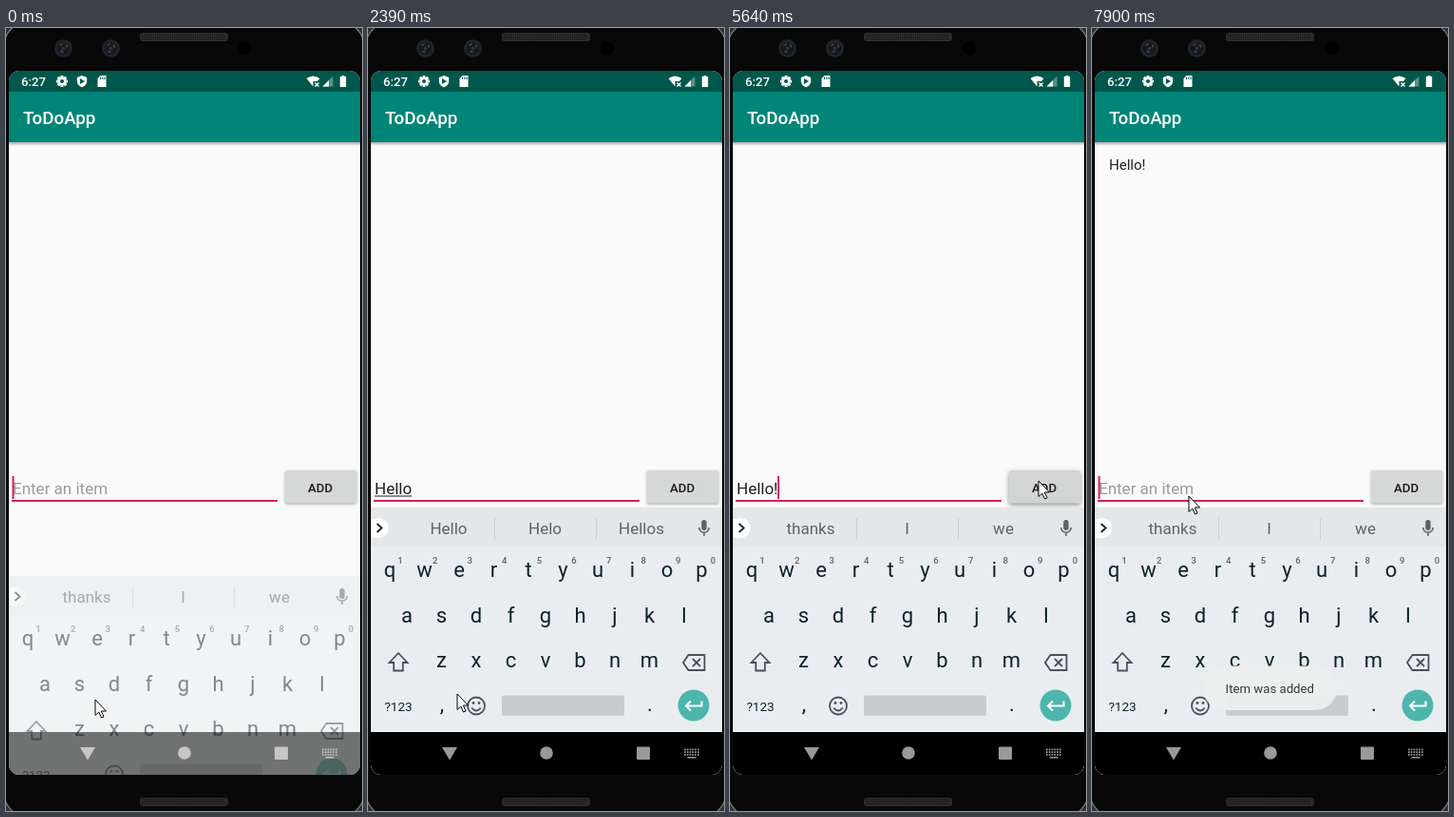
An HTML page with a canvas for the animation above (8 s loop, 375 by 823 pixels).

```html
<!DOCTYPE html>
<html lang="en">
<head>
<meta charset="utf-8">
<title>To-do app</title>
<style>
html, body { margin: 0; width: 100%; height: 100%; overflow: hidden; background: #000; }
canvas { display: block; }
</style>
</head>
<body>
<canvas id="stage" width="375" height="823"></canvas>
<script>
const LOOP = 8000;
const ctx = document.getElementById('stage').getContext('2d');
const INK = '#0c2227', GREY = '#5a6469', ICON = '#46525a';

// Each track is a list of [start time, ...values]; values hold until the next entry.
const FIELD = [ // text, caret visible
  [0, '', 1], [120, '', 0], [640, '', 1], [1190, 'H', 1], [1470, 'He', 1], [1600, 'Hel', 1],
  [1720, 'Hell', 1], [1870, 'Hello', 1], [2390, 'Hello', 0], [2980, 'Hello!', 1],
  [3500, 'Hello!', 0], [4090, 'Hello!\n', 1], [4520, 'Hello!\n', 0], [5070, 'Hello!\n', 1],
  [5220, 'Hello!', 1], [5760, 'Hello!', 0], [5910, '', 1], [6330, '', 0], [6730, '', 1],
  [7280, '', 0], [7780, '', 1]
];
const HINTS = [
  [0, 'thanks', 'I', 'we'], [1190, 'H', '*Hi', 'He'], [1470, 'He', 'Hey', 'Her'],
  [1600, 'Hel', '*Hello', 'Help'], [1720, 'Hell', 'Hello', 'Help'],
  [1870, 'Hello', 'Helo', 'Hellos'], [3100, 'thanks', 'I', 'we']
];
const POINTER = [
  [0, 94, 706], [120, 94, 700], [4520, 193, 579], [4670, 204, 542], [4820, 237, 500],
  [4950, 275, 450], [5070, 294, 453], [5220, 297, 460], [5370, 311, 468], [5500, 322, 475],
  [5640, 325, 476], [6180, 318, 479], [6330, 210, 490], [6460, 99, 499],
  [6730, 101, 496], [6860, 102, 494], [7010, 102, 492]
];
const SLIDE = [[0, 72, .5, .53], [120, 14, .88, .85], [240, 0, 1, 1]]; // offset, opacity, nav bar
const TOAST = [[0, 0], [6060, .45], [6180, .88], [6330, 1], [7900, .93]];

function at(track, t) {
  let current = track[0];
  for (const entry of track) if (entry[0] <= t) current = entry;
  return current.slice(1);
}

function text(str, x, y, size, color, align = 'left', weight = 400) {
  ctx.font = `${weight} ${size}px Roboto, sans-serif`;
  ctx.textAlign = align;
  ctx.fillStyle = color;
  ctx.fillText(str, x, y);
  return ctx.measureText(str).width;
}

function rect(x, y, w, h, color, radius = 0) {
  ctx.fillStyle = color;
  ctx.beginPath();
  ctx.roundRect(x, y, w, h, radius);
  ctx.fill();
}

function disc(x, y, r, color) {
  rect(x - r, y - r, 2 * r, 2 * r, color, r);
}

// Paths are given relative to (x, y).
function path(d, x, y, fill, stroke, width = 2) {
  const shape = new Path2D(d);
  ctx.save();
  ctx.translate(x, y);
  if (fill) { ctx.fillStyle = fill; ctx.fill(shape); }
  if (stroke) { ctx.strokeStyle = stroke; ctx.lineWidth = width; ctx.stroke(shape); }
  ctx.restore();
}

function speaker(y) {
  rect(141, y, 93, 9, '#2b2b2b', 3);
  for (let i = 0; i < 44; i++)
    for (let j = 0; j < 3; j++) rect(143 + i * 2, y + 1.5 + j * 2.2, 1, 1, '#111');
}

function lens(x) {
  disc(x, 21.5, 9.5, '#20242b');
  disc(x, 21.5, 6.5, '#14171c');
  path('M-4 -3 L-1 -5 M3 -4 L4 -1 M-3 3 L0 4', x, 21.5, null, '#48505c', 1.5);
  disc(x, 21.5, 2, '#2c3440');
}

function body() {
  rect(0, 0, 375, 823, '#303030');
  rect(-3, -8, 381, 839, '#080808', 30);
  ctx.strokeStyle = '#777';
  ctx.lineWidth = 1.2;
  ctx.stroke();
  speaker(5);
  speaker(809);
  lens(60.5);
  lens(110.5);
  disc(252, 21.5, 7, '#000');
}

function statusBar() {
  rect(3, 45, 370, 22, '#00574b');
  text('6:27', 16, 61, 13.2, '#fff', 'left', 500);
  for (let i = 0; i < 4; i++) {
    ctx.save();
    ctx.translate(59, 56);
    ctx.rotate(i * Math.PI / 4);
    rect(-1.5, -6, 3, 12, '#fff', .5);
    ctx.restore();
  }
  disc(59, 56, 4.3, '#fff');
  disc(59, 56, 2, '#00574b');
  path('M0 -6 L5.2 -4 V0 Q5 4.3 0 6.3 Q-5 4.3 -5.2 0 V-4Z', 80, 56, '#fff');
  path('M-2 -3 L3 0 L-2 3Z', 80, 56, '#00574b');
  path('M-1.5 -6 H4.5 V6 H-4.5 V-3Z', 101, 56, '#fff');
  path('M-1.5 -4.5 V-2 M.8 -4.5 V-2 M3 -4.5 V-2', 101, 56, null, '#00574b', 1);
  path('M-7 -3 Q0 -8 7 -3 L4.5 0 H0 V5.5Z', 323.5, 56, '#fff');
  path('M2 1.5 L6 5.5 M6 1.5 L2 5.5', 323.5, 56, null, '#fff', 1.4);
  path('M5.5 -5.5 V5.5 H-5.5Z', 339, 56, 'rgba(255,255,255,.35)');
  path('M1 -1 V5.5 H-5.5Z', 339, 56, '#fff');
  path('M-1.5 -6 H1.5 V-5 H3.2 V6 H-3.2 V-5 H-1.5Z', 355, 56, '#fff');
}

function appBar() {
  const shadow = ctx.createLinearGradient(0, 120, 0, 124);
  shadow.addColorStop(0, 'rgba(0,0,0,.32)');
  shadow.addColorStop(1, 'rgba(0,0,0,0)');
  rect(3, 120, 370, 4, shadow);
  rect(3, 67, 370, 53, '#008577');
  text('ToDoApp', 18, 101, 18.8, '#fff', 'left', 500);
}

function field(t) {
  const [value, caret] = at(FIELD, t);
  const wrapped = value.endsWith('\n');
  let width = 0;
  if (!value) text('Enter an item', 7, 490, 17, '#9b9b9b');
  else if (wrapped) text(value.trim(), 7, 470, 17, '#222');
  else width = text(value, 7, 490, 17, '#222');
  if (value && t < 2980) rect(7, 491.5, width, 1, '#222');
  rect(6, 496, 280, 2, '#d0215f');
  if (caret) rect(6.5 + width, wrapped ? 474 : 471, 2, wrapped ? 21 : 24, '#d81b60');
}

function addButton(t) {
  const pressed = t >= 5640 && t < 6180;
  ctx.save();
  ctx.shadowColor = `rgba(0,0,0,${pressed ? .42 : .35})`;
  ctx.shadowBlur = pressed ? 5 : 3;
  ctx.shadowOffsetY = pressed ? 2 : 1;
  rect(294, 465, 75, 34.5, pressed ? '#d3d5d4' : '#d6d7d7', 2);
  ctx.restore();
  text('ADD', 331, 487.5, 13.2, '#1c1c1c', 'center', 500);
}

function suggestions(t) {
  rect(3, 504, 370, 41, '#e3e7ea');
  rect(3, 516, 9, 20, '#fff');
  disc(11, 525.5, 10.5, '#fff');
  path('M-2.5 -4.5 L2.5 0 L-2.5 4.5', 12, 525.5, null, '#222', 1.8);
  at(HINTS, t).forEach((word, i) => {
    const bold = word[0] === '*';
    text(word.replace('*', ''), 85 + i * 101.5, 532, 17, bold ? '#000' : GREY, 'center', bold ? 700 : 400);
  });
  rect(133, 515, 1, 23, '#cbd0d3');
  rect(240, 515, 1, 23, '#cbd0d3');
  rect(351.3, 517, 5.4, 11, GREY, 2.7);
  path('M-5.3 -1 A5.3 5.3 0 0 0 5.3 -1 M0 4.5 V8', 354, 526, null, GREY, 1.6);
}

function keyboard(t) {
  rect(3, 545, 370, 240, '#e9edf0');
  suggestions(t);
  const key = (c, x, y) => text(c, x, y, 22, INK, 'center');
  [...'qwertyuiop'].forEach((c, i) => {
    key(c, 23 + i * 36.5, 577);
    text((i + 1) % 10, 34 + i * 36.6, 562.5, 9.5, GREY, 'center', 500);
  });
  [...'asdfghjkl'].forEach((c, i) => key(c, 41 + i * 36.5, 625));
  [...'zxcvbnm'].forEach((c, i) => key(c, 77.5 + i * 36.5, 672));
  path('M0 -9.5 L9.5 .5 H4.8 V9 H-4.8 V.5 H-9.5Z', 32, 666.5, null, ICON, 1.8);
  path('M-11 0 L-5.5 -8 H11.5 V8 H-5.5Z M-1 -4 L7 4 M7 -4 L-1 4', 343, 667, null, ICON, 1.8);
  text('?123', 32, 717.5, 13.5, INK, 'center');
  key(',', 78, 718);
  key('.', 297, 718);
  path('M9 0 A9 9 0 1 1 -9 0 A9 9 0 1 1 9 0 M-4.8 2 Q0 8 4.8 2', 114, 712.5, null, ICON, 1.8);
  disc(111, 709.5, 1.4, ICON);
  disc(117, 709.5, 1.4, ICON);
  rect(141, 701.5, 129, 21.5, '#c8cccf', 2);
  disc(343, 712, 16.5, '#4db6ac');
  path('M8.5 -4.5 V.5 H-7.5 M-3 -4.5 L-8 .5 L-3 5.5', 343, 712, null, '#fff', 2);
}

function toast(t) {
  ctx.globalAlpha = at(TOAST, t)[0];
  rect(117, 670.5, 141, 46.5, '#eeefef', 23);
  text('Item was added', 187.3, 699, 13.2, '#2a2a2a', 'center');
  ctx.globalAlpha = 1;
}

function navBar(opacity) {
  const tint = 'rgba(255,255,255,.6)';
  rect(3, 740, 370, 45, `rgba(0,0,0,${opacity})`);
  path('M-8 -6.5 H8 L0 7Z', 86, 762.5, tint);
  disc(188, 762, 6.8, tint);
  rect(283, 755.5, 14, 13.5, tint, 1);
  for (let row = 0; row < 3; row++)
    for (let i = 0; i < 6; i++) rect(333 + i * 2.8, 757.5 + row * 2.8, 1.7, 1.7, tint);
  rect(336.5, 766, 9, 1.6, tint);
}

function draw(t) {
  const [offset, opacity, navOpacity] = at(SLIDE, t);
  body();
  ctx.save();
  ctx.beginPath();
  ctx.roundRect(3, 45, 370, 740, 11);
  ctx.clip();
  rect(3, 45, 370, 740, '#fafafa');
  statusBar();
  appBar();
  if (t >= 6060) text('Hello!', 18, 148.5, 15, '#222');
  field(t);
  addButton(t);
  ctx.save();
  ctx.translate(0, offset);
  ctx.globalAlpha = opacity;
  keyboard(t);
  ctx.restore();
  toast(t);
  navBar(navOpacity);
  ctx.restore();
  const [x, y] = at(POINTER, t);
  path('M0 0 V16.5 L3.8 13 L6.5 19 L9 18 L6.4 12 H11.5Z', x, y, '#fff', '#000', 1);
}

function frame() {
  draw(performance.now() % LOOP);
  requestAnimationFrame(frame);
}
frame();
</script>
</body>
</html>
```
